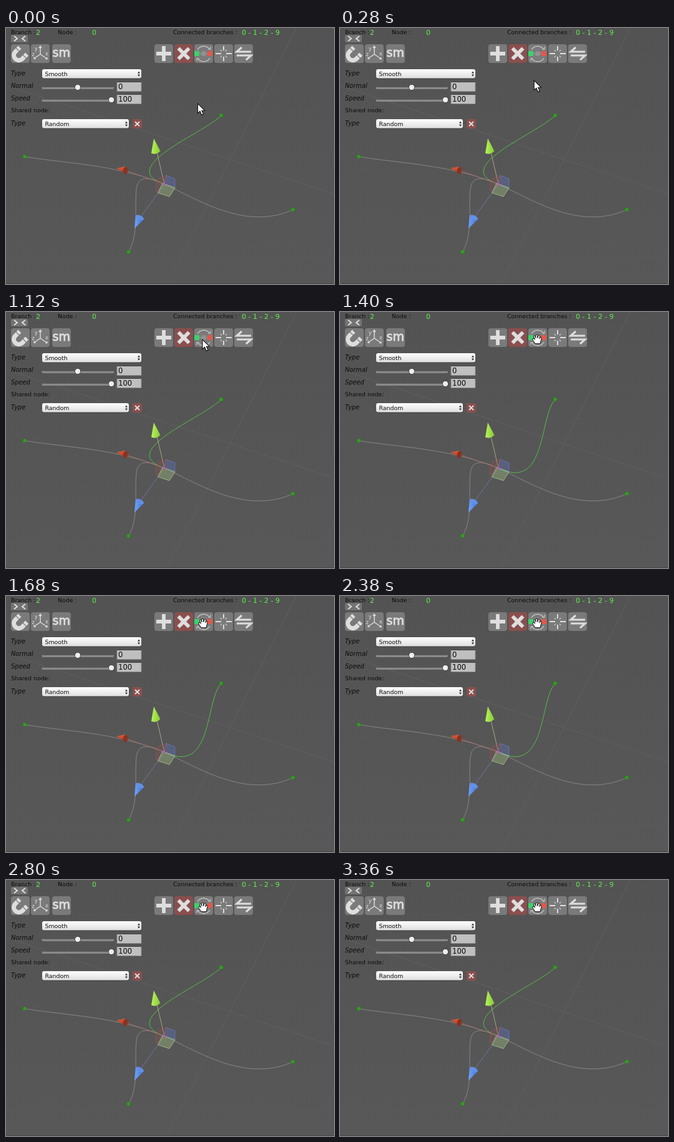
Recreate the animation shown at these times as an HTML page. Size 526 by 410 pixels, loop 3.43 s.

```html
<!DOCTYPE html>
<html lang="en">
<head>
<meta charset="utf-8">
<title>Branch node handles</title>
<style>
html, body { margin: 0; width: 100%; height: 100%; overflow: hidden; background: #565656; }
svg { display: block; width: 526px; height: 410px; }
text { font: 9.4px "DejaVu Sans", sans-serif; fill: #0c0c0c; white-space: pre; }
.label { font-size: 9.8px; font-style: italic; }
.num { font-size: 11px; }
.live { fill: #62f04e; }
.field { font-size: 11.6px; }
.tip { font-size: 10.55px; }
.sm { font-size: 19px; fill: #dedede; stroke: #dedede; stroke-width: .9; }
.axis { font-size: 8px; fill: #dedede; }
.icon { fill: none; stroke: #dedede; stroke-width: 2; }
.wire { fill: none; stroke: #929292; stroke-width: .8; }
.pick { fill: none; stroke: #54c446; stroke-width: .95; }
#tooltip rect { filter: drop-shadow(0 3px 3px #0006); }
</style>
</head>
<body>
<svg viewBox="0 0 526 410">
  <defs>
    <linearGradient id="bg" x2="0" y2="1"><stop stop-color="#535353"/><stop offset="1" stop-color="#585858"/></linearGradient>
    <linearGradient id="menu" x2="0" y2="1"><stop stop-color="#fff"/><stop offset="1" stop-color="#dedede"/></linearGradient>
    <linearGradient id="lime"><stop stop-color="#b8f65a"/><stop offset="1" stop-color="#86c636"/></linearGradient>
    <linearGradient id="red" x2="0" y2="1"><stop stop-color="#dc5a3c"/><stop offset="1" stop-color="#a33a26"/></linearGradient>
    <linearGradient id="blue"><stop stop-color="#6ea4fa"/><stop offset="1" stop-color="#4272d4"/></linearGradient>
  </defs>
  <rect width="526" height="410" fill="url(#bg)"/>
  <path d="M0 92L526 266M466 0L258 410" stroke="#626262" stroke-width=".8"/>
  <path d="M0 409.5H526" stroke="#464646"/>

  <!-- branches -->
  <g class="wire">
    <path d="M30 206C95 217 175 218 254 250C310 276 385 325 460 291"/>
    <path d="M254 250C235 242 212 232 209 258C206 290 213 330 197 358"/>
  </g>
  <path id="branch" class="pick"/>
  <g id="nodes" fill="#319f1f" stroke="#277d1a" stroke-width=".6"></g>

  <!-- gizmo -->
  <g fill="none" stroke-width=".8">
    <path d="M254 250L242 199" stroke="#b5bd8c"/>
    <path d="M254 250L195 229" stroke="#a86a62"/>
    <path d="M254 250L215 304" stroke="#6f7fb8"/>
    <path d="M254 250L256.500 236L271 241.500L271 256Z" fill="#6070b8" fill-opacity=".4" stroke="#6675c0"/>
    <path d="M254 250L256.500 236L244 241Q239 250 241 262Z" fill="#a05050" fill-opacity=".2" stroke="#a85050" stroke-opacity=".8"/>
    <path d="M251 249L271 256L262 270L243.500 264Z" fill="#8fa878" fill-opacity=".5" stroke="#aac694"/>
  </g>
  <circle cx="254" cy="250" r="1.8" fill="#d448c8"/>
  <path d="M237 177L233 200.500Q241 204 247.500 197Z" fill="url(#lime)"/>
  <path d="M177 224.500L191 222Q197 225 193 234Z" fill="url(#red)"/>
  <ellipse cx="191.500" cy="228.300" rx="3.800" ry="5.800" fill="#873422" transform="rotate(10 191.500 228.300)"/>
  <path d="M206 321L208 301Q215 297 221 306.500Z" fill="url(#blue)"/>
  <ellipse cx="214.500" cy="303.500" rx="7" ry="3.400" fill="#6290e6" transform="rotate(25 214.500 303.500)"/>

  <!-- header -->
  <text x="8" y="10">Branch :</text><text class="num live" x="48" y="10.500">2</text>
  <text x="83" y="10">Node :</text><text class="num live" x="138" y="10.500">0</text>
  <text x="268" y="10">Connected branches :</text><text class="num live" x="378" y="10.500">0 - 1 - 2 - 9</text>

  <!-- toolbar -->
  <rect x="8" y="11" width="27" height="12" rx="2" fill="#737373"/>
  <path d="M13 13L18 17L13 21M31 13L26 17L31 21" class="icon"/>
  <g id="buttons"></g>
  <g class="icon">
    <path d="M22 31L14.500 38.500A8 8 0 0 0 25.500 50L33.500 42" stroke-width="7"/>
    <path d="M16 32L21.500 37.500M27 43L32.500 48.500" stroke="#7a7a7a" stroke-width="1.200"/>
    <path d="M55 42V29M55 42L45 49M55 42L66 49.500M53 32L55 29L57 32M47.500 49.500L45 49L45.500 46.500M65.500 47L66 49.500L63.500 50" stroke-width="1.400"/>
    <path d="M253 29V53M241 41H265" stroke-width="5.800"/>
    <path d="M276.500 32.500L293.500 49.500M293.500 32.500L276.500 49.500" stroke-width="5.800"/>
    <path d="M307 35A11.500 11.500 0 0 1 327 35M327 48A11.500 11.500 0 0 1 307 48" stroke="#c4c4c4" stroke-width="1.400"/>
    <path d="M324 34H328V30M310 49H306V53" stroke="#c4c4c4" stroke-width="1.200"/>
    <path d="M310 41H324" stroke="#a0a0a0" stroke-width="1"/>
    <path d="M349 29V36M349 46V53M336 41H345M353 41H362" stroke-width="1.900"/>
    <path d="M344 35L346 37.500M354 35L352 37.500M344 47L346 44.500M354 47L352 44.500" stroke-width="1.200"/>
    <path d="M393 38H370L378 31M370 44H393L385 51" stroke-width="3"/>
  </g>
  <text class="axis" x="46" y="36">y</text>
  <text class="axis" x="63" y="44">x</text>
  <text class="axis" x="41.500" y="45">z</text>
  <text class="sm" x="74.500" y="46">sm</text>
  <rect x="302" y="37" width="8" height="8" fill="#3ed06c"/>
  <rect x="313.500" y="37.500" width="7" height="7" fill="#929292"/>
  <rect x="323" y="37" width="8" height="8" fill="#e0584e"/>

  <!-- properties -->
  <text class="label" x="8" y="76">Type</text>
  <text class="label" x="8" y="96">Normal</text>
  <text class="label" x="8" y="116">Speed</text>
  <text x="8" y="135">Shared node:</text>
  <text class="label" x="8" y="156">Type</text>
  <g id="controls"></g>
  <rect x="203" y="146" width="15" height="15" rx="2" fill="#8a4f4e"/>
  <path d="M207 150L214 157M214 150L207 157" class="icon" stroke-width="2.400"/>

  <!-- overlays -->
  <g id="tooltip">
    <rect x="211.500" y="67" width="210.500" height="17" fill="#f1f1f1" stroke="#a8a8a8" stroke-width=".6"/>
    <text class="tip" x="214" y="79.700">Flips the handles of the selected node</text>
  </g>
  <g id="ring" fill="none">
    <circle cx="316" cy="43.800" stroke="#d8d8d8" stroke-width="2.400" opacity=".4"/>
    <circle cx="316" cy="43.800" stroke="#0b0b0b" stroke-width="1.300"/>
  </g>
  <path id="arrow" d="M0 0V15.500L3.600 12.200L6.200 18.300L9 17.100L6.400 11.200H11.200Z" fill="#fff" stroke="#111" stroke-width="1.100"/>
  <path id="hand" transform="translate(0 .7)" d="M313 50L309 44Q308 41 311 42L312.500 43.500L310.500 38Q311 36 313 38L314 41L313.800 36.500Q315 34.500 316.500 36.500L317 41L318 36.800Q320 35.500 320.500 38L320 42L321.500 39.500Q323.500 39 323 42L321 50Z" fill="#fff" stroke="#111" stroke-width="1"/>
</svg>
<script>
const LOOP = 3430, STEP = 70;
const $ = id => document.getElementById(id);

const button = (x, fill = '#7a7a7a') =>
  `<rect x="${x}" y="26" width="30" height="30" rx="4" fill="${fill}"/>`;
const menu = (y, width, value) => `
  <rect x="58" y="${y + 1}" width="${width}" height="14.5" rx="3" fill="#3c3c3c"/>
  <rect x="58" y="${y}" width="${width}" height="14.5" rx="3" fill="url(#menu)"/>
  <path d="M${52 + width} ${y + 6.5}l2 -3l2 3zm0 2l2 3l2 -3z" fill="#222"/>
  <text x="62.5" y="${y + 11}">${value}</text>`;
const slider = (y, knob, value) => `
  <rect x="57.5" y="${y - 1.5}" width="115.5" height="4.5" rx="2" fill="#8a8a8a"/>
  <path d="M58.5 ${y - 1}H172" stroke="#383838"/>
  <circle cx="${knob}" cy="${y}" r="4.6" fill="#eee" stroke="#333" stroke-width=".8"/>
  <rect x="178" y="${y - 8.5}" width="39" height="15" fill="#bfbfbf" stroke="#8a8a8a" stroke-width=".8"/>
  <path d="M178 ${y - 8.5}h39" stroke="#444"/>
  <text class="field" x="180" y="${y + 3.2}">${value}</text>`;

$('buttons').innerHTML = [8, 40, 74, 238, 302, 334, 366].map(x => button(x)).join('') + button(270, '#8a4f4e');
$('controls').innerHTML = menu(66, 159, 'Smooth') + menu(146, 139, 'Random')
  + slider(95, 115, 0) + slider(115, 169, 100);
$('nodes').innerHTML = [[30, 206], [345, 140], [460, 291], [196.5, 358.5]]
  .map(([x, y]) => `<circle cx="${x}" cy="${y}" r="3"/>`).join('');

const branch = handle => `M345 140C319 168 ${handle} 254 250`;
const curves = { normal: branch('174 223'), flipped: branch('332 288') };
const clicks = [1190, 2590];

const within = (t, from, to) => t >= from && t < to;
const show = (id, on) => $(id).setAttribute('visibility', on ? 'visible' : 'hidden');
const ease = (t, from, to) => {
  const p = Math.min(1, Math.max(0, (t - from) / (to - from)));
  return p * p * (3 - 2 * p);
};

function draw(t) {
  const travel = ease(t, 0, 560), settle = ease(t, 560, 840);
  $('arrow').setAttribute('transform', `translate(${307.5 + 7.5 * travel} ${121 - 74 * travel - 3 * settle})`);
  show('arrow', t < 1190);
  show('hand', t >= 1190);
  $('branch').setAttribute('d', within(t, 1330, 2730) ? curves.flipped : curves.normal);
  show('tooltip', within(t, 2450, 2730));

  const click = clicks.find(c => within(t, c, c + 210));
  show('ring', click !== undefined);
  if (click !== undefined) {
    const age = (t - click) / STEP;
    for (const circle of $('ring').children) circle.setAttribute('r', 18 + 12 * age);
    $('ring').setAttribute('opacity', age > 1 ? .45 : 1);
  }
}

const start = performance.now();
function tick() {
  const t = (performance.now() - start) % LOOP;
  draw(Math.floor(t / STEP) * STEP);
  requestAnimationFrame(tick);
}
tick();
</script>
</body>
</html>
```
